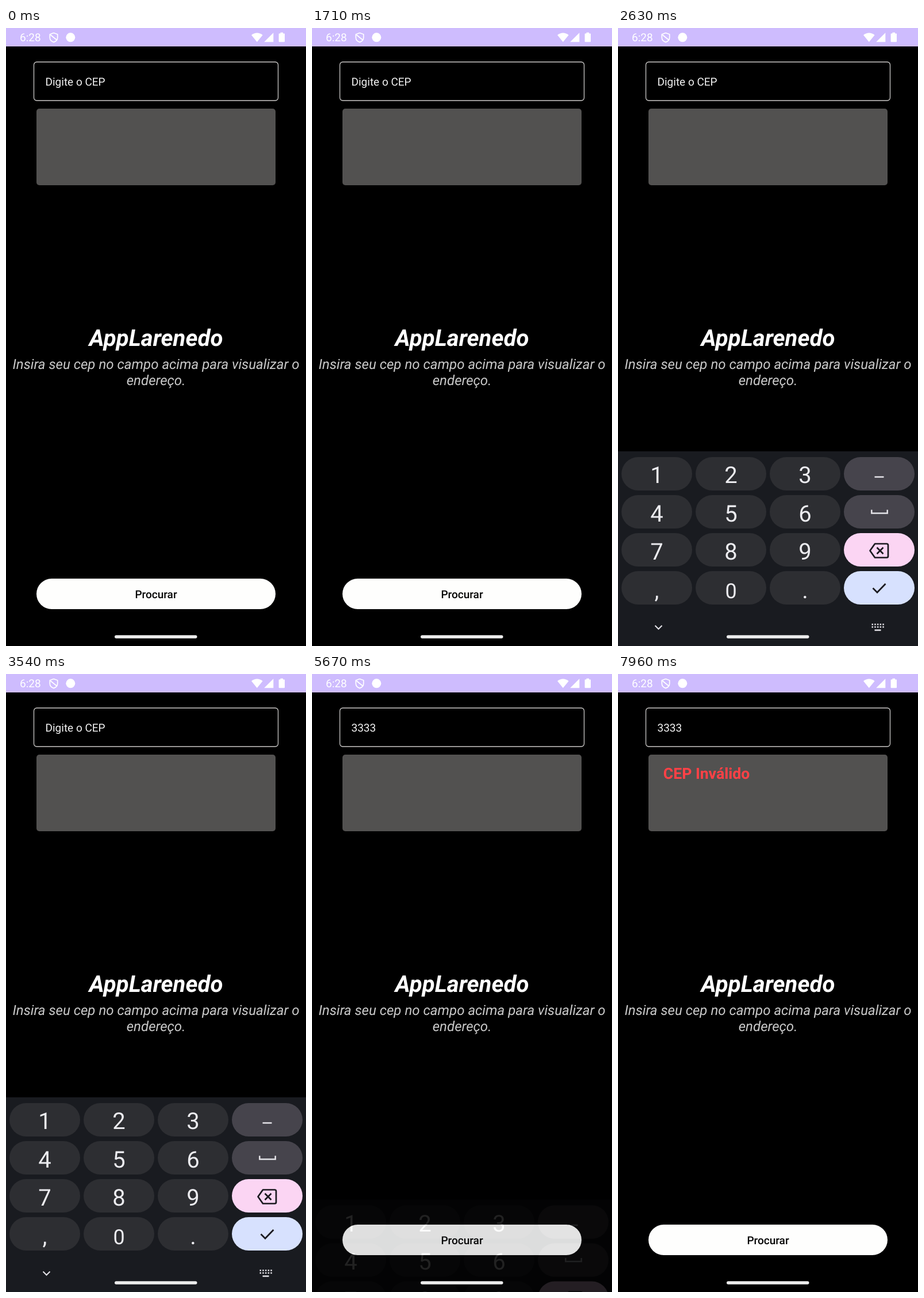
Write an HTML page that moves like this. It is 522 by 1073 pixels and loops after 8 s.

```html
<!DOCTYPE html>
<html lang="pt">
<head>
<meta charset="utf-8">
<style>
html, body { margin: 0; width: 100%; height: 100%; overflow: hidden; background: #000; }
svg { display: block; width: 100vw; height: 100vh; font-family: Roboto, sans-serif; text-rendering: geometricPrecision; }
</style>
</head>
<body>
<svg viewBox="0 0 522 1073" xmlns="http://www.w3.org/2000/svg">
  <defs>
    <clipPath id="pill"><rect x="53" y="956" width="416" height="53" rx="26.5"/></clipPath>
  </defs>
  <rect width="522" height="1073" fill="#000"/>

  <!-- status bar -->
  <rect width="522" height="32" fill="#cebcfe"/>
  <g fill="#fff">
    <text x="24" y="23" font-size="19">6:28</text>
    <path d="M83 8.500L89.700 11V16.500C89.700 20.500 86.800 23.400 83 24.600C79.200 23.400 76.300 20.500 76.300 16.500V11ZM77.500 12L88 20.500" fill="none" stroke="#fff" stroke-width="1.700" stroke-linejoin="round"/>
    <circle cx="112.300" cy="16.300" r="8"/>
    <path d="M427 12.300Q436.800 4.800 446.600 12.300L436.800 24.200Z"/>
    <path d="M465.300 8.300V24.200H449.200Z"/>
    <path d="M477.500 9.500V7.800H482V9.500H484Q485 9.500 485 10.500V23.200Q485 24.200 484 24.200H475.600Q474.600 24.200 474.600 23.200V10.500Q474.600 9.500 475.600 9.500Z"/>
  </g>

  <!-- search field and result card -->
  <rect x="48.500" y="59" width="425" height="67" rx="5" fill="none" stroke="#cbc9c8" stroke-width="1.300"/>
  <text id="field" x="68.500" y="100" font-size="19" fill="#f2f2f2"></text>
  <rect id="caret" y="80" width="2.500" height="25.500" fill="#cfbcff"/>
  <rect x="53" y="140" width="416" height="133" rx="5" fill="#525150"/>
  <text id="error" x="78.800" y="182" font-size="26.600" font-weight="700" fill="#ff4146">CEP Inválido</text>

  <g text-anchor="middle" font-style="italic">
    <text x="261" y="552" font-size="40.200" font-weight="700" fill="#fff">AppLarenedo</text>
    <g font-size="24.100" fill="#c9c9c9">
      <text x="261" y="592">Insira seu cep no campo acima para visualizar o</text>
      <text x="261" y="620">endereço.</text>
    </g>
  </g>

  <!-- button -->
  <rect x="53" y="956" width="416" height="53" rx="26.500" fill="#fefefd"/>
  <circle id="ripple" cx="187" cy="983" clip-path="url(#pill)"/>
  <text x="261" y="990" font-size="19" font-weight="500" text-anchor="middle" fill="#050505">Procurar</text>

  <!-- keyboard -->
  <g id="board">
    <rect y="735" width="522" height="338" fill="#191b20"/>
    <g id="keys" text-anchor="middle"></g>
    <g fill="none" stroke="#e4e3e8" stroke-width="2.500">
      <path d="M446.500 779.500H462.500"/>
      <path d="M441.300 836.500V842.500H468.700V836.500"/>
      <g stroke="#1b1a20" stroke-width="2.700">
        <path d="M447 895.500H467.500Q470 895.500 470 898V917Q470 919.500 467.500 919.500H447L438.500 907.500Z" stroke-linejoin="round"/>
        <path d="M450.500 902L461.500 913M461.500 902L450.500 913"/>
        <path d="M443.500 972.500L451 980L465.500 965"/>
      </g>
      <path d="M64.500 1037.500L70.500 1043.500L76.500 1037.500" stroke-width="2"/>
      <path d="M441.500 1035.500H463M441.500 1040H463" stroke-dasharray="2.500 2.200"/>
      <path d="M446.500 1045.500H457.500"/>
    </g>
  </g>

  <rect x="189" y="1054.200" width="143.500" height="5.500" rx="2.750" fill="#ededed"/>
</svg>
<script>
const LOOP = 8000, SLIDE = 338, MOVE = 200;
const SHOW = 2416, HIDE = 5537, TAP = 6420, ERROR = 7630;
const TYPED = [4090, 4210, 4330, 5170];
const CARET = [[3040, 3540], [4040, 4830], [5170, 5540]];

const $ = id => document.getElementById(id);
const [field, caret, error, ripple, board, keys] =
  ["field", "caret", "error", "ripple", "board", "keys"].map($);
const clamp = v => Math.min(1, Math.max(0, v));

function add(tag, attrs, text) {
  const el = document.createElementNS("http://www.w3.org/2000/svg", tag);
  for (const k in attrs) el.setAttribute(k, attrs[k]);
  if (text) el.textContent = text;
  keys.appendChild(el);
}

const sideFill = ["#46444c", "#46444c", "#fbd5f3", "#d7e1fe"];
["123", "456", "789", ",0."].forEach((row, r) => {
  for (let c = 0; c < 4; c++) {
    const x = 6 + 129 * c, y = 745 + 66 * r;
    add("rect", { x, y, width: 123, height: 58, rx: 29, fill: c < 3 ? "#2d2e32" : sideFill[r] });
    if (c < 3) add("text", {
      x: x + 61.5, y: 790 + 66.5 * r, fill: "#ececf0", "font-size": row[c] === "0" ? 36 : 40
    }, row[c]);
  }
});

// cubic Bezier easing, solved for x by bisection
function ease(x1, y1, x2, y2, x) {
  const at = (a, b, s) => 3 * a * s * (1 - s) ** 2 + 3 * b * s * s * (1 - s) + s ** 3;
  let lo = 0, hi = 1;
  for (let i = 0; i < 24; i++) {
    const mid = (lo + hi) / 2;
    if (at(x1, x2, mid) < x) lo = mid; else hi = mid;
  }
  return at(y1, y2, (lo + hi) / 2);
}

function draw(t) {
  const up = clamp((t - SHOW) / MOVE), down = clamp((t - HIDE) / MOVE);
  const shift = down > 0 ? ease(0.4, 0, 1, 1, down) : 1 - ease(0, 0, 0.2, 1, up);
  board.setAttribute("transform", `translate(0 ${(SLIDE * shift).toFixed(2)})`);
  board.setAttribute("opacity", clamp(2 * up) * clamp(1 - 1.28 * down));

  const count = TYPED.filter(k => t >= k).length;
  field.textContent = count ? "3".repeat(count) : "Digite o CEP";
  caret.setAttribute("x", 68.5 + 10.67 * count);
  caret.setAttribute("opacity", CARET.some(([a, b]) => t >= a && t < b) ? 1 : 0);

  const p = t - TAP;
  ripple.setAttribute("r", 40 + 90 * ease(0.4, 0, 0.2, 1, clamp(p / 225)));
  ripple.setAttribute("opacity", 0.1 * clamp(p / 75) * clamp((460 - p) / 150));
  error.setAttribute("opacity", t >= ERROR ? 1 : 0);
}

const start = performance.now();
function tick() {
  draw((performance.now() - start) % LOOP);
  requestAnimationFrame(tick);
}
tick();
</script>
</body>
</html>
```
